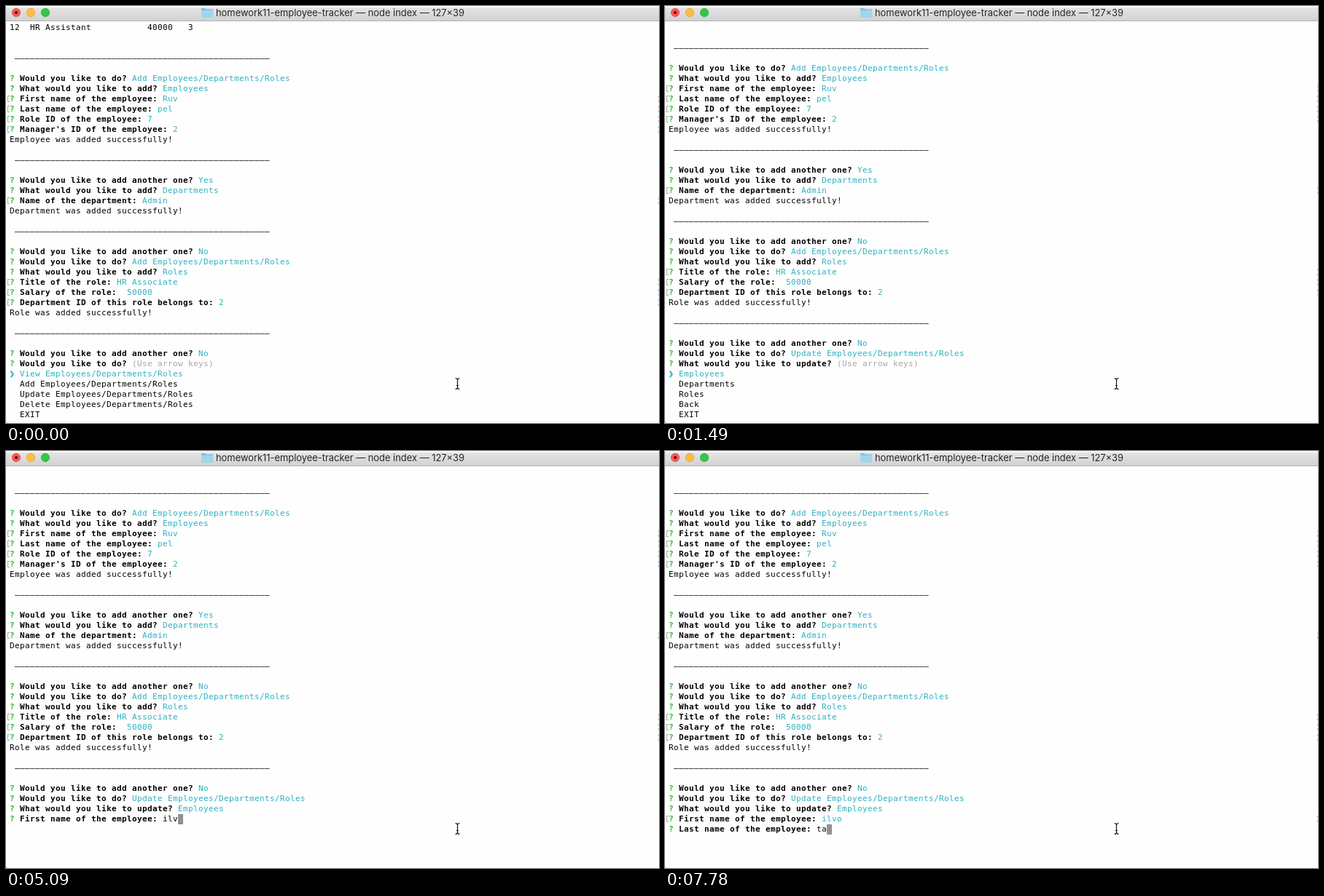
Animation, 896 px wide and 573 px high, one loop 8 s. Source, as an HTML page:

```html
<!DOCTYPE html>
<html lang="en">
<head>
<meta charset="utf-8">
<title>Employee tracker</title>
<style>
html, body { margin: 0; width: 100%; height: 100%; overflow: hidden; background: #fefefe; }
svg { position: absolute; left: 0; top: 0; }
#title { font: 12.9px Inter, sans-serif; fill: #262626; }
#screen {
  position: absolute; left: 5px; top: 23px; margin: 0; color: #000;
  font: 11px/14px "DejaVu Sans Mono", monospace; letter-spacing: .378px;
}
.row { position: relative; height: 14px; width: 891px; }
.q { color: #2fb92f; }
.a { color: #2fb1c0; }
.a b { -webkit-text-stroke: .6px; }
.hint { color: #a6a6a6; }
.mark::before, .mark::after {
  content: ""; position: absolute; top: 2px; height: 9px; box-sizing: border-box;
}
.mark::before { left: -3px; width: 3px; border: 1px solid #aaa; border-right: 0; }
.mark::after { right: 0; width: 1px; border-right: 1px dashed #bbb; }
.cursor { display: inline-block; width: 7px; height: 14px; background: #919191; vertical-align: top; }
</style>
</head>
<body>
<pre id="screen"></pre>
<svg width="896" height="573">
  <defs>
    <linearGradient id="bar" x2="0" y2="1">
      <stop stop-color="#e6e6e6"/><stop offset="1" stop-color="#d2d2d2"/>
    </linearGradient>
  </defs>
  <rect width="896" height="20" fill="url(#bar)"/>
  <rect width="896" height="2" fill="#f8f8f8"/>
  <rect y="20" width="896" height="1" fill="#b4b4b4"/>
  <g stroke-width=".7">
    <circle cx="14" cy="9" r="5.7" fill="#fc5753" stroke="#df4744"/>
    <circle cx="34" cy="9" r="5.7" fill="#fdbc40" stroke="#de9f34"/>
    <circle cx="54" cy="9" r="5.7" fill="#33c748" stroke="#27aa35"/>
  </g>
  <circle cx="14" cy="9" r="2" fill="#4d0000"/>
  <path d="M268 3h5l2 1.5h9V16h-16z" fill="#80c4e0"/>
  <path d="M268 6h16v10h-16z" fill="#a0d6ec"/>
  <text id="title" x="288" y="14">homework11-employee-tracker — node index — 127×39</text>
  <path d="M616.5 511.5q3 0 3 2.5v10q0 2.5-3 2.5M622.5 511.5q-3 0-3 2.5v10q0 2.500 3 2.500M618 521.5h3" fill="none" stroke="#111" stroke-width="1.2"/>
  <path d="M0 571q0 2 2 2H0z" fill="#a98b55"/>
</svg>
<script>
const screen = document.getElementById("screen");
const span = (cls, text) => `<span class="${cls}">${text}</span>`;
const row = (html = "", cls = "") => `<div class="row ${cls}">${html}</div>`;
const question = (text, rest = "", cls = "") => row(`${span("q", "<b>?</b>")} <b>${text}</b> ${rest}`, cls);
const ask = (text, answer) => question(text, span("a", answer));
const typed = (text, answer) => question(text, span("a", answer), "mark");
const entry = (text, value) => question(text, value + span("cursor", ""));
const hint = span("hint", "(Use arrow keys)");
const menu = (items, picked) => items.map((item, i) =>
  row(i === picked ? span("a", "<b>❯</b> " + item) : "  " + item));
const rule = [row(), row(" " + "–".repeat(50)), row()];

const DO = "Would you like to do?", ADD = "What would you like to add?",
  MORE = "Would you like to add another one?", UPDATE = "What would you like to update?",
  FIRST = "First name of the employee:", LAST = "Last name of the employee:",
  ALL = " Employees/Departments/Roles";
const actions = [...["View", "Add", "Update", "Delete"].map(verb => verb + ALL), "EXIT"];
const targets = ["Employees", "Departments", "Roles", "Back", "EXIT"];

const history = [
  row("12  HR Assistant".padEnd(27) + "40000   3"), row(), ...rule,
  ask(DO, "Add" + ALL),
  ask(ADD, "Employees"),
  typed(FIRST, "Ruv"),
  typed(LAST, "pel"),
  typed("Role ID of the employee:", "7"),
  typed("Manager's ID of the employee:", "2"),
  row("Employee was added successfully!"), ...rule,
  ask(MORE, "Yes"),
  ask(ADD, "Departments"),
  typed("Name of the department:", "Admin"),
  row("Department was added successfully!"), ...rule,
  ask(MORE, "No"),
  ask(DO, "Add" + ALL),
  ask(ADD, "Roles"),
  typed("Title of the role:", "HR Associate"),
  typed("Salary of the role:", " 50000"),
  typed("Department ID of this role belongs to:", "2"),
  row("Role was added successfully!"), ...rule,
  ask(MORE, "No")
];
const scrolled = [...history.slice(1), ask(DO, "Update" + ALL)];

const choose = (picked, note) => [...history, question(DO, note), ...menu(actions, picked)];
const first = value => [...scrolled, ask(UPDATE, "Employees"), entry(FIRST, value)];
const last = value => [...scrolled, ask(UPDATE, "Employees"), typed(FIRST, "ilvo"), entry(LAST, value)];

const steps = [
  [0, choose(0, hint)],
  [450, history],
  [590, choose(1)],
  [890, choose(2)],
  [1490, [...scrolled, question(UPDATE, hint), ...menu(targets, 0)]],
  [2990, first("")],
  [4340, first("i")],
  [4940, first("il")],
  [5090, first("ilv")],
  [5240, first("ilvo")],
  [5840, last("")],
  [7490, last("t")],
  [7780, last("ta")]
];

let shown;
function draw() {
  const time = performance.now() % 8000;
  const step = steps.findLast(([start]) => start <= time);
  if (step !== shown) {
    shown = step;
    screen.innerHTML = step[1].join("");
  }
  requestAnimationFrame(draw);
}
draw();
</script>
</body>
</html>
```
